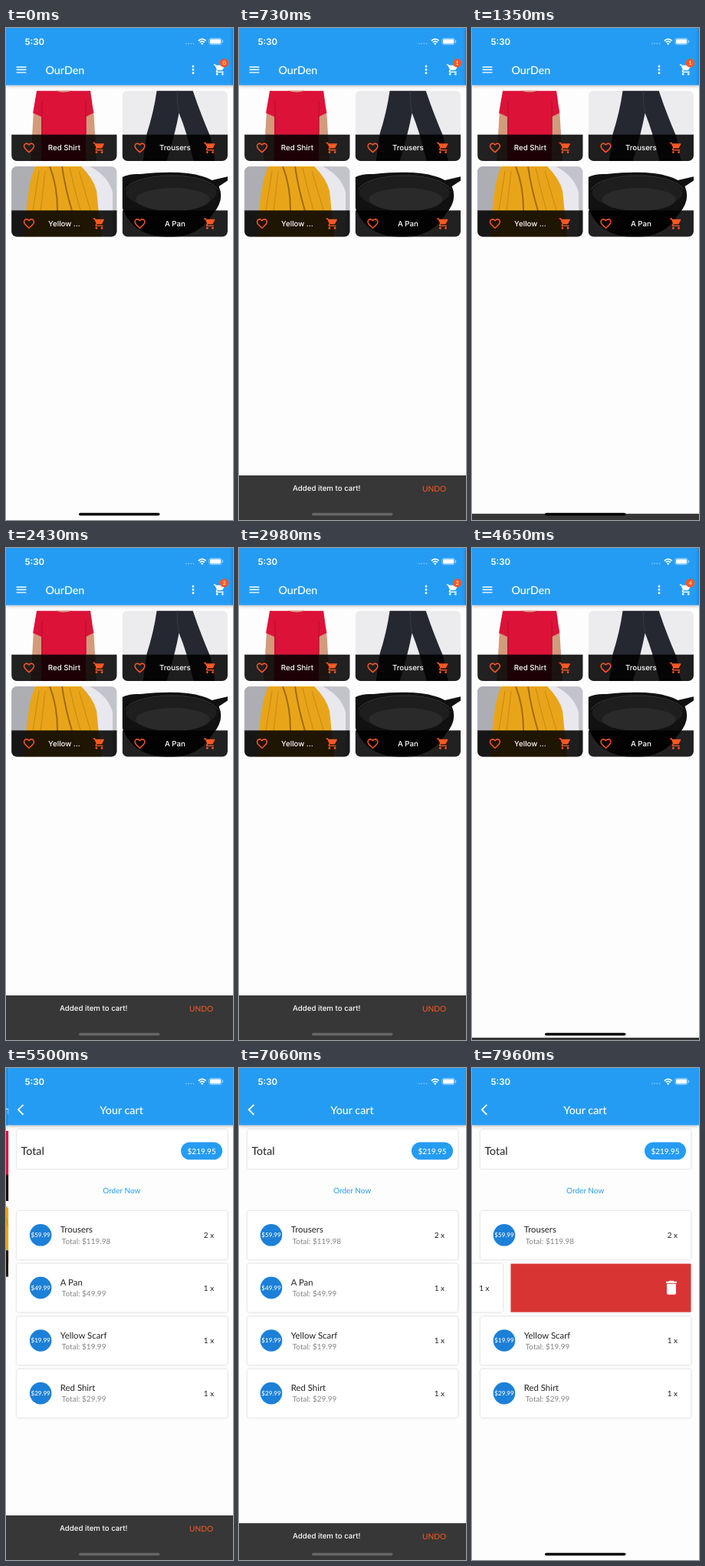
Animation of 296 by 640 pixels, one loop 8000 ms. Source, as an HTML page:

```html
<!DOCTYPE html>
<html lang="en">
<head>
<meta charset="utf-8">
<title>Shop and cart</title>
<style>
  html, body { margin: 0; width: 100%; height: 100%; overflow: hidden; background: #fdfdfd; }
  svg { display: block; }
  text { font-family: Lato, sans-serif; font-size: 10px; text-rendering: geometricPrecision; }
  .ui { font-family: Inter, sans-serif; font-size: 9.7px; font-weight: 500; }
  .title { font-size: 14.3px; font-weight: 500; }
  .mid { text-anchor: middle; }
  .card { fill: #fff; filter: drop-shadow(0 .8px .8px rgba(0,0,0,.24)); }
  .bar { fill: #259cf4; filter: drop-shadow(0 1.4px 2px rgba(0,0,0,.3)); }
</style>
</head>
<body>
<svg id="stage" width="296" height="640" viewBox="0 0 296 640"></svg>
<script>
const LOOP = 8000, W = 296, SNACK_H = 58;
const BLUE = '#259cf4', ORANGE = '#ff5722', PAGE = '#fdfdfd';

// Material icon outlines on a 24 px grid
const ICONS = {
  menu: 'M3 18h18v-2H3zM3 13h18v-2H3zM3 6v2h18V6z',
  more: 'M12 8a2 2 0 1 0 0-4 2 2 0 0 0 0 4zm0 2a2 2 0 1 0 0 4 2 2 0 0 0 0-4zm0 6a2 2 0 1 0 0 4 2 2 0 0 0 0-4z',
  back: 'M16.2 3.9L14.4 2.1 4.5 12l9.9 9.9 1.8-1.8L8 12z',
  cart: 'M7 18a2 2 0 1 0 0 4 2 2 0 0 0 0-4zM1 2v2h2l3.6 7.6-1.35 2.4C4.5 15.4 5.5 17 7 17h12v-2H7.4l-.2-.4.9-1.6h7.45c.75 0 1.4-.4 1.75-1l3.6-6.5A1 1 0 0 0 20 4H5.2l-.93-2zM17 18a2 2 0 1 0 0 4 2 2 0 0 0 0-4z',
  heart: 'M16.5 3c-1.74 0-3.41.81-4.5 2.09C10.91 3.81 9.24 3 7.5 3 4.42 3 2 5.42 2 8.5c0 3.78 3.4 6.86 8.55 11.54L12 21.35l1.45-1.32C18.6 15.36 22 12.28 22 8.5 22 5.42 19.58 3 16.5 3zm-4.4 15.55l-.1.1-.1-.1C7.14 14.24 4 11.39 4 8.5 4 6.5 5.5 5 7.5 5c1.54 0 3.04.99 3.57 2.36h1.87C13.46 5.99 14.96 5 16.5 5c2 0 3.5 1.5 3.5 3.5 0 2.89-3.14 5.74-7.9 10.05z',
  trash: 'M6 19c0 1.1.9 2 2 2h8c1.1 0 2-.9 2-2V7H6zM19 4h-3.5l-1-1h-5l-1 1H5v2h14z'
};

const icon = (name, x, y, fill = '#fff', k = .715) =>
  `<path d="${ICONS[name]}" fill="${fill}" transform="translate(${x} ${y}) scale(${k}) translate(-12 -12)"/>`;
const text = (s, x, y, fill, attrs = '') => `<text x="${x}" y="${y}" fill="${fill}" ${attrs}>${s}</text>`;
const shape = (d, fill) => `<path d="${d}" fill="${fill}"/>`;
const line = (d, stroke, w) => `<path d="${d}" fill="none" stroke="${stroke}" stroke-width="${w}"/>`;
const box = (x, y, w, h, fill, rx = 0) => `<rect x="${x}" y="${y}" width="${w}" height="${h}" rx="${rx}" fill="${fill}"/>`;

const art = {
  shirt: box(0, 0, 138, 92, '#fdfdfd') +
    shape('M29 24H40V92H25ZM97 24H107L111 92H97Z', '#d49a7c') +
    shape('M33 0H103L107 29 97 34V92H39V34L28 29Z', '#dc1239') +
    line('M40 14V58M97 14V58', '#b80f30', 1.2) +
    '<ellipse cx="68" cy="-1" rx="11" ry="3" fill="#d49a7c"/>',
  trousers: box(0, 0, 138, 92, '#ececee') +
    shape('M45 0H92Q102 30 115 60L121 92H93Q85 56 74 29Q69 56 58 92H27L32 56Q41 28 45 0Z', '#252731') +
    line('M72 0Q71 14 74 29', '#343743', 1.2),
  scarf: box(0, 0, 138, 92, '#c3c4cb') + box(0, 0, 30, 92, '#adaeb4') +
    shape('M84 0H102Q126 12 132 34V92H84Z', '#e9e8ee') +
    shape('M31 0H91Q107 16 111 32L117 92H17L20 50Q23 18 31 0Z', '#e9a51a') +
    line('M50 0Q60 25 60 58M66 0Q70 28 79 58', '#a06c10', 2) +
    line('M36 6L28 57M44 6L38 57M88 6L103 57M76 2Q82 30 90 57', '#cb8d14', 1.2),
  pan: box(0, 0, 138, 92, '#fdfdfd') +
    shape('M0 14Q10 9 24 10Q90 3 117 18L138 13V18L126 26Q134 44 118 62Q100 92 62 92Q14 92 0 54Z', '#111') +
    '<ellipse cx="64" cy="34" rx="59" ry="21" fill="#1e1e1e"/>' +
    '<ellipse cx="66" cy="43" rx="48" ry="15" fill="#2a2a2a"/>' +
    line('M4 30A61 22 0 0 1 124 30', '#444', .8)
};

function tile(x, y, name, picture) {
  return `<g transform="translate(${x} ${y})" clip-path="url(#tile)">${picture}` +
    box(0, 57.2, 138, 35, 'rgba(0,0,0,.87)') + icon('heart', 22.9, 74.4, ORANGE) +
    text(name, 68.8, 77.7, '#fff', 'class="ui mid"') + icon('cart', 114.4, 74.4, ORANGE) + '</g>';
}

const header = `<rect class="bar" y="-5" width="${W}" height="79.3"/>`;

const shop = box(0, 0, W, 640, PAGE) +
  tile(7.1, 81.5, 'Red Shirt', art.shirt) + tile(151.6, 81.5, 'Trousers', art.trousers) +
  tile(7.1, 180.1, 'Yellow ...', art.scarf) + tile(151.6, 180.1, 'A Pan', art.pan) + header +
  icon('menu', 20, 54.3) + text('OurDen', 51.5, 59.8, '#fff', 'class="title"') +
  icon('more', 244, 54.3) + icon('cart', 278.7, 54.3) +
  `<circle cx="284.5" cy="45.5" r="5.6" fill="${ORANGE}"/>` +
  text('0', 284.5, 48.2, '#fff', 'id="badge" class="mid" style="font-size:7.2px"');

const ITEMS = [
  ['Trousers', '59.99', 2, '119.98'], ['A Pan', '49.99', 1, '49.99'],
  ['Yellow Scarf', '19.99', 1, '19.99'], ['Red Shirt', '29.99', 1, '29.99']
];

function row([name, price, count, total], i) {
  const card = '<rect class="card" x="11" width="274.5" height="63" rx="2.8"/>' +
    '<circle cx="42" cy="31.3" r="14.3" fill="#1c80d8"/>' +
    text('$' + price, 42, 34.2, '#fff', 'class="mid" style="font-size:8.1px;font-weight:500"') +
    text(name, 67.7, 28.4, '#222', 'style="font-size:11.4px"') +
    text('Total: $' + total, 69.7, 42.7, '#858585') +
    text(count + ' x', 254.7, 35, '#222');
  const swiped = i === 1;
  const under = swiped ? box(11, 0, 274.5, 63, '#d93434') + icon('trash', 260, 31.2, '#fff', 1) : '';
  const cover = swiped ? box(0, -1, W, 65, PAGE) : '';
  return `<g transform="translate(0 ${186 + i * 68.6})">${under}<g${swiped ? ' id="swipe"' : ''}>${cover}${card}</g></g>`;
}

const cart = box(0, 0, W, 640, PAGE) + ITEMS.map(row).join('') +
  '<rect class="card" x="11" y="80" width="274.5" height="51" rx="2.8"/>' +
  text('Total', 16.4, 113.3, '#222', 'style="font-size:14.3px"') +
  box(225, 96.5, 54, 22.8, BLUE, 11.4) + text('$219.95', 252, 111.5, '#fff', 'class="mid" style="font-weight:500"') +
  text('Order Now', 147.7, 162.5, BLUE, 'class="mid"') + header +
  icon('back', 17, 54.3) + text('Your cart', 147.5, 59.8, '#fff', 'class="title mid"');

const status = text('5:30', 24.5, 22, '#fff', 'class="ui" style="font-size:11.5px;font-weight:600"') +
  [235, 238.2, 241.4, 244.6].map(x => `<circle cx="${x}" cy="20.3" r=".9" fill="#fff" opacity=".45"/>`).join('') +
  line('M250.8 16.6Q255.8 12 260.8 16.6M252.7 18.7Q255.8 16 258.9 18.7', '#fff', 1.6) +
  shape('M254 20.2Q255.8 18.8 257.6 20.2L255.8 22Z', '#fff') +
  '<rect x="264.8" y="13.4" width="16.6" height="8.2" rx="2.4" fill="none" stroke="#fff" stroke-width=".7" opacity=".6"/>' +
  box(266, 14.6, 14.2, 5.8, '#fff', 1.4) + box(282.2, 16, 1, 3, 'rgba(255,255,255,.6)', .5);

const snackBar = box(0, 0, W, SNACK_H + 1, '#373737') +
  text('Added item to cart!', 70, 19.6, '#fff', 'class="ui"') + text('UNDO', 239, 20.8, ORANGE, 'style="font-size:10.2px"');

document.getElementById('stage').innerHTML =
  '<defs><clipPath id="tile"><rect width="137.4" height="91.5" rx="7.1"/></clipPath></defs>' +
  `<g id="shop">${shop}</g><g id="cart">${cart}</g>${status}` +
  `<g id="snack">${snackBar}</g><rect id="home" x="95" y="630.7" width="105.5" height="3.6" rx="1.8"/>`;

const [shopEl, cartEl, swipeEl, snackEl, homeEl, badgeEl] =
  ['shop', 'cart', 'swipe', 'snack', 'home', 'badge'].map(id => document.getElementById(id));

const clamp = v => Math.min(1, Math.max(0, v));

function bezier(x1, y1, x2, y2) {
  const at = (a, b, s) => 3 * (1 - s) * (1 - s) * s * a + 3 * (1 - s) * s * s * b + s * s * s;
  return t => {
    if (t <= 0 || t >= 1) return clamp(t);
    let lo = 0, hi = 1;
    for (let i = 0; i < 24; i++) {
      const s = (lo + hi) / 2;
      if (at(x1, x2, s) < t) lo = s; else hi = s;
    }
    return at(y1, y2, lo);
  };
}
const fastOutSlowIn = bezier(.4, 0, .2, 1);
const pageEase = bezier(.35, .91, .33, .97);

// The picture only refreshes in bursts: [first, last, steps]
const BURSTS = [[500, 730, 3], [1020, 1350, 4], [2180, 2180, 1], [2430, 2980, 6], [3500, 4040, 6],
  [4330, 4870, 6], [5180, 5500, 4], [6740, 7160, 5], [7640, 7960, 4]];
const STOPS = [0, ...BURSTS.flatMap(([a, b, n]) =>
  Array.from({ length: n }, (_, i) => Math.round((a + (n > 1 ? (b - a) * i / (n - 1) : 0)) / 10) * 10))];

// The snack bar alternately starts to show and to hide
const SNACK_EDGES = [480, 1049, 1299, 2460, 2710, 3520, 3770, 4366, 4616, 6946];
const BADGE_TIMES = [500, 2430, 3500, 4330];

function snackLevel(t) {
  const i = SNACK_EDGES.filter(e => e <= t).length - 1;
  if (i < 0) return 0;
  const p = clamp((t - SNACK_EDGES[i]) / 250);
  return fastOutSlowIn(i % 2 ? 1 - p : p);
}

const move = (el, x, y) => el.setAttribute('transform', `translate(${x.toFixed(2)} ${y.toFixed(2)})`);

function draw(t) {
  const level = snackLevel(t);
  move(snackEl, 0, 640 - SNACK_H * level);
  homeEl.setAttribute('fill', level > .5 ? '#666' : '#000');
  badgeEl.textContent = BADGE_TIMES.filter(b => b <= t).length;

  const page = pageEase((t - 5172) / 400);
  move(shopEl, -W / 3 * page, 0);
  move(cartEl, W * (1 - page), 0);
  move(swipeEl, -245.5 * Math.pow(clamp((t - 7600) / 360), 1.2), 0);
}

let shown = -1;
function tick(now) {
  const t = now % LOOP;
  const stop = STOPS.filter(s => s <= t).pop();
  if (stop !== shown) draw(shown = stop);
  requestAnimationFrame(tick);
}
draw(0);
requestAnimationFrame(tick);
</script>
</body>
</html>
```
